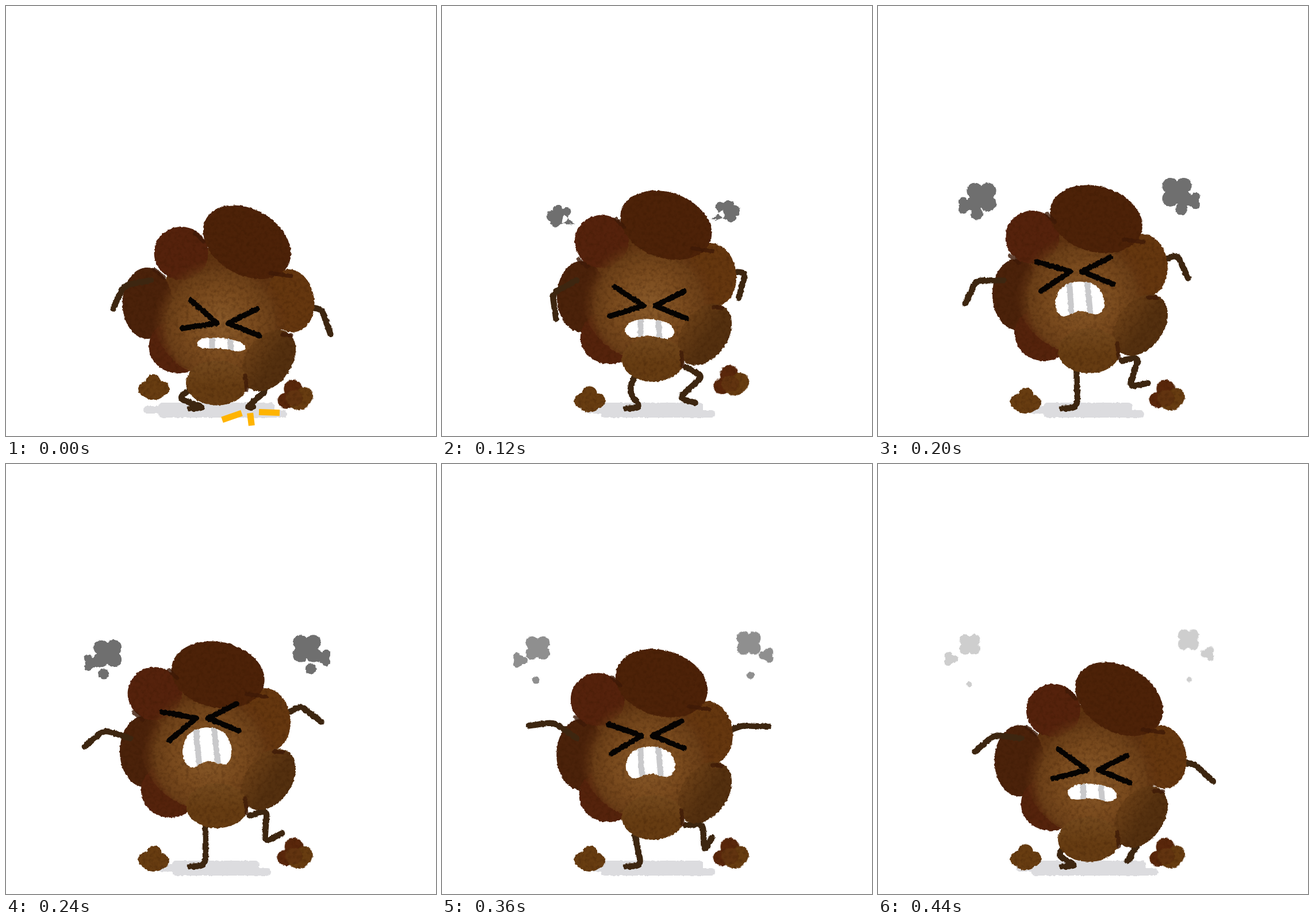
Write an HTML page that moves like this. It is 748x748 px and loops after 480 ms.

```html
<!DOCTYPE html>
<html lang="en">
<head>
<meta charset="utf-8">
<title>Stomp</title>
<style>
  html, body { margin: 0; width: 100%; height: 100%; overflow: hidden; background: #fff; }
  svg { display: block; width: 100vw; height: 100vh; }
</style>
</head>
<body>
<svg viewBox="0 0 748 748" fill="none" stroke-linecap="round" stroke-linejoin="round">
  <defs>
    <filter id="rough" filterUnits="userSpaceOnUse" x="0" y="0" width="748" height="748" color-interpolation-filters="sRGB">
      <feTurbulence type="fractalNoise" baseFrequency=".2" numOctaves="2" seed="4"/>
      <feColorMatrix values="1 0 0 0 0  0 1 0 0 0  0 0 1 0 0  0 0 0 0 1" result="noise"/>
      <feDisplacementMap in="SourceGraphic" in2="noise" scale="4" xChannelSelector="R" yChannelSelector="G"/>
    </filter>
    <filter id="grain" filterUnits="userSpaceOnUse" x="0" y="0" width="748" height="748" color-interpolation-filters="sRGB">
      <feTurbulence type="fractalNoise" baseFrequency=".16" numOctaves="4" seed="9"/>
      <feColorMatrix values="0 0 0 0 .2  0 0 0 0 .08  0 0 0 0 0  .7 0 0 0 -.3"/>
      <feComposite operator="in" in2="SourceAlpha" result="spots"/>
      <feMerge><feMergeNode in="SourceGraphic"/><feMergeNode in="spots"/></feMerge>
    </filter>
    <radialGradient id="belly" cy=".6">
      <stop offset="0" stop-color="#895a2a"/>
      <stop offset=".5" stop-color="#7a4b1e"/>
      <stop offset=".78" stop-color="#6c4018" stop-opacity=".95"/>
      <stop offset="1" stop-color="#5f3010" stop-opacity="0"/>
    </radialGradient>
    <linearGradient id="chin" x2="0" y2="1">
      <stop offset="0" stop-color="#754a1e"/>
      <stop offset=".6" stop-color="#663c12"/>
    </linearGradient>
    <linearGradient id="flank" x2="0" y2="1">
      <stop offset="0" stop-color="#6b4017"/>
      <stop offset=".6" stop-color="#54300f"/>
    </linearGradient>
    <clipPath id="bite"></clipPath>
  </defs>
  <g filter="url(#rough)">
    <g id="ground" fill="#dcdcdf"></g>
    <g id="back" stroke="#3d2610" stroke-width="10.5"></g>
    <g id="body" filter="url(#grain)"></g>
    <g id="front" stroke="#3d2610" stroke-width="10.5"></g>
    <g id="face"></g>
    <g id="crumbs" filter="url(#grain)"></g>
    <g id="smoke" fill="#6f6f6f"></g>
  </g>
  <g id="sparks" fill="#ffb400"></g>
</svg>
<script>
const STEP = 40, COUNT = 12;
const $ = id => document.getElementById(id);
const rad = deg => deg * Math.PI / 180;
const mix = (a, b, u) => a + (b - a) * u;
const parts = [];
let step = 0, sway = 0, bounce = 0, nod = 0;

// Cosine over the loop that peaks `lag` steps in.
const wave = (lag, n = 1) => Math.cos(n * 2 * Math.PI * (step - lag) / COUNT);

// Shared motion: sideways lean, vertical stomp and the later head nod.
function moveRig() {
  sway = -1 + 23.3 * wave(.29) + 8.8 * wave(-1.09, 2);
  bounce = 34 * wave(0) + 7.7 * wave(-.71, 2);
  nod = wave(.8);
}
const joint = (x, y, lean, lift) => [x + sway * lean, y + bounce * lift];
const off = ([x, y], dx, dy) => [x + dx, y + dy];
// Point at a distance and an angle measured from straight down.
const reach = (p, len, deg) => off(p, len * Math.sin(rad(deg)), len * Math.cos(rad(deg)));

function set(el, attrs) {
  for (const k in attrs) el.setAttribute(k, attrs[k]);
}
function add(parent, tag, attrs = {}) {
  const el = document.createElementNS('http://www.w3.org/2000/svg', tag);
  set(el, attrs);
  return parent.appendChild(el);
}
const at = p => p.map(v => v.toFixed(1)).join(' ');

// Polyline with softened corners.
function limbPath(p, soft) {
  let d = 'M' + at(p[0]);
  for (let i = 1; i < p.length - 1; i++) {
    const toward = q => {
      const len = Math.hypot(q[0] - p[i][0], q[1] - p[i][1]) || 1;
      const u = Math.min(.5, soft / len);
      return p[i].map((v, k) => mix(v, q[k], u));
    };
    d += 'L' + at(toward(p[i - 1])) + 'Q' + at(p[i]) + ' ' + at(toward(p[i + 1]));
  }
  return d + 'L' + at(p[p.length - 1]);
}
// Closed curve through all points.
function blobPath(p) {
  const n = p.length, get = i => p[(i + n) % n];
  const ctrl = (i, dir) => get(i).map((v, k) => v + dir * (get(i + 1)[k] - get(i - 1)[k]) / 6);
  return 'M' + at(p[0]) + p.map((_, i) =>
    'C' + [ctrl(i, 1), ctrl(i + 1, -1), get(i + 1)].map(at).join(' ')).join('') + 'Z';
}

function limb(parent, points, soft = 0, attrs = {}) {
  const el = add(parent, 'path', attrs);
  parts.push(() => set(el, { d: limbPath(points(), soft) }));
}
function lobe(fill, x, y, rx, ry, turn, lean, lift, twist = 0) {
  const el = add($('body'), 'ellipse', { fill, rx, ry });
  parts.push(() => set(el, {
    transform: `translate(${at(joint(x, y, lean, lift))}) rotate(${turn + twist * sway})`
  }));
}
function seam(x1, y1, x2, y2, lean, lift) {
  limb($('body'), () => [joint(x1, y1, lean, lift), joint(x2, y2, lean, lift)], 0,
    { stroke: '#3f1a07', 'stroke-width': 7, opacity: .8 });
}

// Body
lobe('#5f3411', 361, 503, 110, 112, 0, .45, .7);
lobe('#4b220a', 243, 507, 43, 62, 0, .1, .25);
lobe('#55230c', 292, 578, 51, 47, 0, .3, .35);
lobe('#65370f', 472, 473, 41, 55, -8, .9, 1);
lobe('#55220c', 279, 412, 47, 46, 0, 1, .45);
lobe('url(#belly)', 361, 503, 118, 118, 0, .45, .7);
lobe('url(#flank)', 457, 577, 59, 40, -55, 0, 1);
lobe('url(#chin)', 367, 620, 54, 39, 0, 0, .9);
lobe('#4d2208', 391, 385, 82, 57, 20, 1.1, .65, .4);
seam(304, 374, 318, 388, 1, .55);
seam(238, 443, 254, 456, .8, .4);
seam(437, 427, 472, 432, .9, .95);
seam(473, 530, 488, 531, .3, 1.05);
seam(416, 607, 419, 632, 0, .9);

// Arms
limb($('front'), () => {
  const shoulder = [234 + 18 * wave(0), 477];
  const elbow = reach(shoulder, 48, -93 - 35 * wave(8.2));
  return [shoulder, elbow, reach(elbow, 44, -37 - 47 * wave(8.5))];
}, 11);
limb($('back'), () => {
  const shoulder = joint(509, 470, .8, 1.35);
  const elbow = off(shoulder, 20, -3 + 9 * wave(1));
  return [shoulder, elbow, reach(elbow, 45, 36 + 54 * wave(8.4))];
}, 9);

// Legs: one planted, one stomping
limb($('back'), () => {
  const hip = [335 - 12 * wave(0), 646 + bounce / 2], heel = [347, 699];
  const bow = 40 * Math.max(0, nod);
  return [hip, [mix(hip[0], heel[0], .5) - bow, mix(hip[1], heel[1], .5)], heel, [320, 700]];
}, 15);
limb($('back'), () => [
  [424, 632 + .7 * bounce],
  [454, 635 + 34 * wave(.5)],
  [434 + 27 * wave(7.8), 678 + 21 * wave(.4)],
  [455 + 29 * wave(7), 670 + 34 * wave(1.2)]
], 11);

// Eyes
const ink = { stroke: '#050302', 'stroke-width': 9.5 };
const gaze = () => [349 + 18 * wave(.2), 497 + 60 * nod];
limb($('face'), () => {
  const tip = gaze(), tilt = -91 - 17 * nod;
  return [reach(tip, 61, tilt - 25), tip, reach(tip, 61, tilt + 25)];
}, 0, ink);
limb($('face'), () => {
  const tip = off(gaze(), 20, 0);
  return [off(tip, 50, -25), tip, off(tip, 54, 22)];
}, 0, ink);

// Mouth
const mouth = add($('face'), 'g');
const lips = add(mouth, 'path', { fill: '#fff' });
const cut = add($('bite'), 'path');
const teeth = add(mouth, 'path', { 'clip-path': 'url(#bite)', stroke: '#c9c9cb', 'stroke-width': 10 });
parts.push(() => {
  const h = 46 - 27 * nod, x = gaze()[0] + 13 - 6 * nod;
  const d = blobPath([[-43, .1], [-31, -.34], [0, -.5], [31, -.34], [43, .1], [31, .43], [0, .33], [-31, .46]]
    .map(([px, py]) => [px, py * h]));
  set(lips, { d });
  set(cut, { d });
  set(teeth, { d: `M-17 ${-h / 2}L-15 ${h / 2}M14 ${-h / 2}L18 ${h / 2}` });
  set(mouth, { transform: `translate(${x} ${541 + 52 * nod}) rotate(${1 + 5 * nod})` });
});

// Crumbs hop when the foot lands
function crumb(x, y, height, lag, bumps) {
  const g = add($('crumbs'), 'g');
  bumps.forEach(([cx, cy, rx, ry, fill = '#683d11']) => add(g, 'ellipse', { cx, cy, rx, ry, fill }));
  parts.push(() => set(g, {
    transform: `translate(${x} ${y - height * Math.max(0, wave(lag)) ** 4}) rotate(${4 * wave(7)})`
  }));
}
crumb(257, 687, 42, 1, [[-14, 2, 13, 13], [0, -10, 13, 13], [14, 3, 13, 13], [0, 7, 20, 15]]);
crumb(503, 677, 31, 2.4, [[-3, -11, 16, 16, '#5a270b'], [-16, 9, 15, 14, '#5a270b'],
  [15, 3, 16, 16], [6, 12, 18, 14], [-2, 5, 15, 14, '#623410']]);

// Shadow
const bars = [[690, 26], [696, 13], [703, 13]].map(([y, height]) => add($('ground'), 'rect', { y, height, rx: 6 }));
parts.push(() => {
  const left = 277 - 12 * wave(0), right = 454 + 14 * wave(0);
  [[left, right], [left - 26, left + 40], [right - 60, right + 21]]
    .forEach(([x, end], i) => set(bars[i], { x, width: end - x }));
});

// Smoke: a burst that breaks up, drifts and fades; mirrored on the right
const dot = (x, y, r) => `M${x - r} ${y}a${r} ${r} 0 1 0 ${2 * r} 0a${r} ${r} 0 1 0 ${-2 * r} 0Z`;
function cluster(x, y, r, n, turn) {
  let d = dot(x, y, r * .72);
  for (let i = 0; i < n; i++) {
    const a = rad(turn + 360 * i / n);
    d += dot(x + r * .62 * Math.cos(a), y + r * .58 * Math.sin(a), r * .52);
  }
  return d;
}
const burst = dot(160, 353, 19) + dot(177, 334, 16) + dot(205, 339, 14) + dot(170, 373, 16)
  + dot(184, 353, 26) + 'M196 345L211 362L232 379L190 374ZM198 376L212 376L224 384L211 380Z';
const plumes = [0, 1].map(() => add($('smoke'), 'path'));
parts.push(() => {
  let d = '';
  if (step > 4) {
    d = cluster(197 - 3.4 * step, 348 - 3.1 * step, 33 - 1.25 * step, 4, 45)
      + cluster(174 - 4.4 * step, 354 - 1.4 * step, 16.5 - .4 * step, 3, 0)
      + dot(183 - 2.2 * step, 343 + 3.65 * step, 15.5 - step);
  } else if (step > 2) d = burst;
  const grow = step === 3 ? 'translate(104 171) scale(.55)' : '';
  plumes.forEach((el, i) => set(el, { d, transform: (i ? 'translate(700 -8.5) scale(-1 1) ' : '') + grow }));
  set($('smoke'), { opacity: Math.min(1, 1 - .22 * (step - 8)) });
});

// Sparks fly off and shrink to small squares
function spark(x, y, dx, dy, long, turn) {
  const el = add($('sparks'), 'rect', { height: 11 });
  parts.push(() => {
    const u = step / 2, width = u > 1 ? 0 : mix(long, 14, u);
    set(el, { x: -width / 2, y: -5.5, width, transform: `translate(${x + dx * u} ${y + dy * u}) rotate(${turn})` });
  });
}
spark(393, 714, -42, 14, 36, -19);
spark(426, 719, 14.5, 21, 22, 83);
spark(458, 707, 39, -3, 36, 2);

function draw(now) {
  const next = Math.floor(now / STEP) % COUNT;
  if (next === step && now) return;
  step = next;
  moveRig();
  parts.forEach(update => update());
}
function tick() {
  draw(performance.now());
  requestAnimationFrame(tick);
}
draw(0);
requestAnimationFrame(tick);
</script>
</body>
</html>
```
